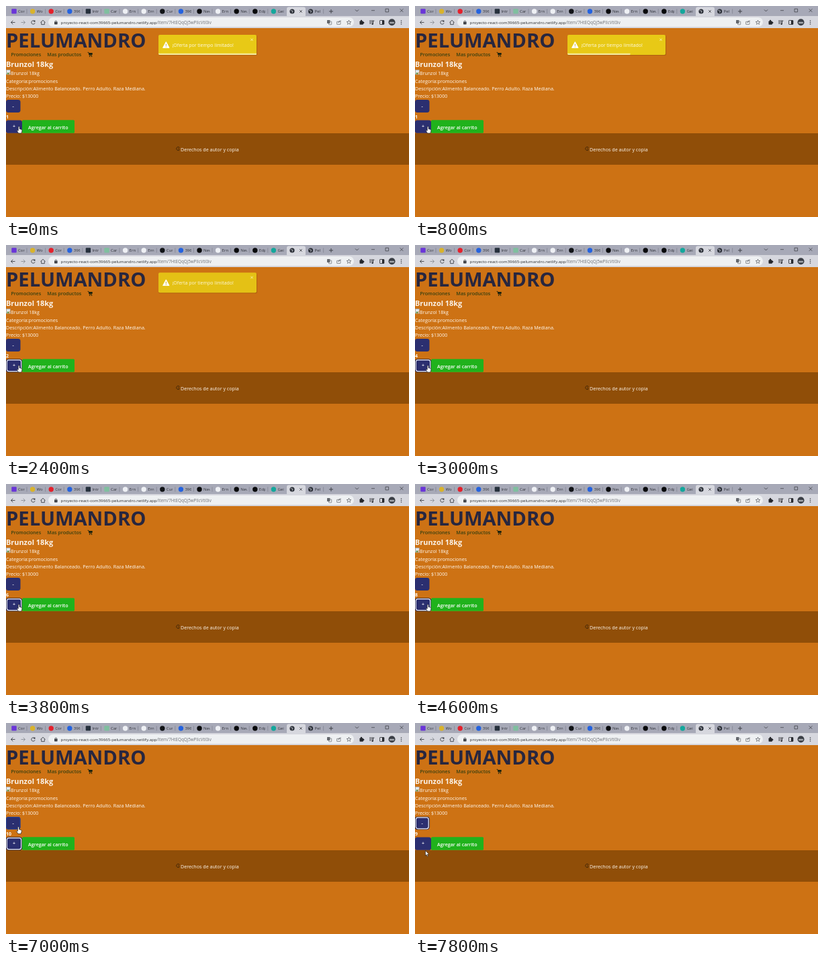
Animation of 600x315 px, one loop 8000 ms. Source, as an HTML page with a canvas:

```html
<!DOCTYPE html>
<html lang="es">
<head>
<meta charset="utf-8">
<title>Tienda</title>
<style>
  html, body { margin: 0; width: 100%; height: 100%; overflow: hidden; background: #cd7214; }
  canvas { display: block; width: 600px; height: 315px; }
</style>
</head>
<body>
<canvas id="stage"></canvas>
<script>
const W = 600, H = 315, LOOP = 8000, STEP = 200, TOP = 33;
const canvas = document.getElementById('stage');
const dpr = window.devicePixelRatio || 1;
canvas.width = W * dpr;
canvas.height = H * dpr;
const c = canvas.getContext('2d');
const FAMILY = '"Open Sans", "Noto Sans", sans-serif';
const DARK = '#35373d', ICON = '#3f4248', BAR = '#d6d7de';

function box(x, y, w, h, fill, r = 0) {
  c.fillStyle = fill;
  c.beginPath();
  c.roundRect(x, y, w, h, r);
  c.fill();
}
function frame(x, y, w, h, color, lw = 0.8, r = 0) {
  c.strokeStyle = color;
  c.lineWidth = lw;
  c.beginPath();
  c.roundRect(x, y, w, h, r);
  c.stroke();
}
function text(s, x, y, size, color, weight = 400, align = 'left') {
  c.font = `${weight} ${size}px ${FAMILY}`;
  c.fillStyle = color;
  c.textAlign = align;
  c.fillText(s, x, y);
  return c.measureText(s).width;
}
function line(color, lw, ...p) {
  c.strokeStyle = color;
  c.lineWidth = lw;
  c.beginPath();
  for (let i = 0; i < p.length; i += 2) c.lineTo(p[i], p[i + 1]);
  c.stroke();
}
function dot(x, y, r, fill) {
  c.fillStyle = fill;
  c.beginPath();
  c.arc(x, y, r, 0, 7);
  c.fill();
}
function ring(x, y, r, color, lw = 0.8, a = 0, b = Math.PI * 2) {
  c.strokeStyle = color;
  c.lineWidth = lw;
  c.beginPath();
  c.arc(x, y, r, a, b);
  c.stroke();
}
function cross(x, y, r, color, lw) {
  line(color, lw, x - r, y - r, x + r, y + r);
  line(color, lw, x + r, y - r, x - r, y + r);
}

const tabs = [
  ['#6a35d8', 'Cor', 1], ['#d9b32c', 'Wo'], ['#e5202b', 'Cor'], ['#2463e0', '396'],
  ['#26303c', 'Intr', 1], ['#7fbf9f', 'Car', 1], ['#eef0f4', 'Ern'], ['#eef0f4', 'Ern'],
  ['#111317', 'Cur'], ['#2463e0', '396'], ['#08090b', 'Nev'], ['#eef0f4', 'Ern'],
  ['#08090b', 'Nev'], ['#08090b', 'Edp'], ['#14a79c', 'Gei'], ['globe', ''], ['globe', 'Pel']
];

function drawTabs() {
  box(0, 0, W, 15, '#a7a9b7');
  const pitch = 27.6;
  tabs.forEach(([color, name, square], i) => {
    const x = 12 + i * pitch;
    if (i === 15) box(x - 8, 1.5, 28, 15, BAR, 3);
    if (color === 'globe') {
      dot(x, 8, 3.6, '#2c3038');
      line('#d5d7de', 0.8, x - 2.3, 6.5, x + 1, 7.5, x, 10.2);
    } else if (square) box(x - 3.7, 4.2, 7.4, 7.4, color, 1);
    else dot(x, 8, 3.7, color);
    c.save();
    c.beginPath();
    c.rect(x + 6, 2, 9.5, 12);
    c.clip();
    text(name, x + 6, 10.2, 6, '#30323a');
    c.restore();
    if (i < 14 || i === 16) line('#777a88', 0.6, x + 19, 4.5, x + 19, 11.5);
  });
  cross(439, 8, 1.8, DARK, 0.8);
  line(DARK, 0.9, 481, 8, 487, 8);
  line(DARK, 0.9, 484, 5, 484, 11);
  line(DARK, 0.8, 520, 5.5, 522.5, 8, 525, 5.5);
  line(DARK, 0.7, 544, 6.7, 549, 6.7);
  frame(565, 4.3, 4.6, 4.6, DARK, 0.7);
  cross(589, 6.7, 2.4, DARK, 0.7);
}

function drawToolbar() {
  box(0, 15, W, TOP - 15, BAR);
  line(ICON, 0.9, 13.5, 24.5, 7.5, 24.5);
  line(ICON, 0.9, 10.3, 21.7, 7.5, 24.5, 10.3, 27.3);
  line('#8d9098', 0.9, 22.5, 24.5, 28.5, 24.5);
  line('#8d9098', 0.9, 25.7, 21.7, 28.5, 24.5, 25.7, 27.3);
  ring(40.5, 24.5, 2.7, ICON, 0.9, 0.3, 5.6);
  box(41.3, 21.5, 2.2, 2.2, ICON);
  line(ICON, 0.9, 51.5, 24.5, 55, 21.3, 58.5, 24.5);
  line(ICON, 0.9, 52.7, 24, 52.7, 27.6, 57.3, 27.6, 57.3, 24);

  box(63, 17, 455, 14, '#eef0f2', 7);
  box(72, 23.6, 4.6, 3.8, ICON, 0.6);
  ring(74.3, 23.5, 1.5, ICON, 0.7, Math.PI, 0);
  const w = text('proyecto-react-com39665-pelumandro.netlify.app', 81.6, 26.7, 6.18, '#2b2d31');
  text('/item/7HtEQqQj5wPIIcVtI0iv', 81.6 + w, 26.7, 6.25, '#6f7278');

  box(478, 21, 4.4, 5, '#64676d', 0.6);
  frame(480.5, 23, 4.2, 4.8, '#64676d', 0.7, 0.5);
  frame(492.6, 23.3, 5.4, 4.2, '#64676d', 0.7, 0.5);
  line('#64676d', 0.8, 494.7, 25.5, 496, 22.6, 499, 22.2);
  c.strokeStyle = '#55585e';
  c.lineWidth = 0.7;
  c.beginPath();
  for (let i = 0; i < 10; i++) {
    const r = i % 2 ? 1.5 : 3.5, a = i * Math.PI / 5 - Math.PI / 2;
    c.lineTo(510.5 + r * Math.cos(a), 24.6 + r * Math.sin(a));
  }
  c.closePath();
  c.stroke();

  box(526.5, 22.5, 5.4, 5.2, '#24262b', 0.7);
  dot(529, 22, 1.2, '#24262b');
  dot(532.2, 25, 1.2, '#24262b');
  for (let i = 0; i < 3; i++) line('#24262b', 0.8, 541, 22 + i * 2, i === 2 ? 544 : 547, 22 + i * 2);
  line('#24262b', 0.8, 548.5, 22.2, 546.5, 22.2, 546.5, 26.5);
  dot(545.7, 26.7, 1.2, '#24262b');
  frame(556.5, 21.5, 6.4, 6, '#24262b', 0.8, 0.6);
  box(560, 21.5, 2.9, 6, '#24262b');
  dot(574.5, 24.3, 5, '#3a3e45');
  box(571, 23.8, 7, 2.4, '#a4a8ae', 1);
  for (let i = -1; i < 2; i++) dot(588.5, 24.5 + i * 2.5, 0.8, ICON);
}

function drawPage() {
  box(0, TOP, W, H - TOP, '#cd7214');
  text('PELUMANDRO', 0, 62, 29.2, '#27263f', 700);
  text('Promociones', 7.5, 75.3, 7.1, '#363f10', 600);
  text('Mas productos', 61.3, 75.3, 7.15, '#363f10', 600);
  line('#16200e', 0.9, 121.6, 69.3, 123, 69.3, 124.3, 73.7, 128, 73.7);
  box(123.5, 70, 5.2, 2.8, '#16200e', 0.4);
  dot(124.6, 75.2, 0.8, '#16200e');
  dot(127.5, 75.2, 0.8, '#16200e');

  text('Brunzol 18kg', 0, 91, 10.9, '#fbf3e9', 700);
  box(0.4, 95.3, 6, 7, '#e4e9ef');
  frame(0.6, 95.5, 5.7, 6.6, '#8b9097', 0.5);
  c.fillStyle = '#4d9448';
  c.beginPath();
  c.moveTo(1, 101.7);
  c.lineTo(3, 98.8);
  c.lineTo(5, 101.7);
  c.fill();
  line('#cd7214', 0.9, 3, 102.4, 6.6, 98.6);
  const body = '#fffaf3';
  text('Brunzol 18kg', 7, 103.4, 7.05, body);
  text('Categoría:promociones', 0, 114.5, 7.1, body);
  text('Descripción:Alimento Balanceado. Perro Adulto. Raza Mediana.', 0, 125.5, 7.08, body);
  text('Precio: $13000', 0, 136.7, 7.05, body);

  box(0, 190, W, 47, '#904e08');
  ring(256.3, 213, 2.6, '#352008', 0.8, 0.5, 5.8);
  line('#352008', 0.7, 256.2, 212, 257.6, 213.2, 256.2, 214.3);
  text('Derechos de autor y copia', 260, 216.5, 7.14, body);
}

function button(x, y, w, h, label, focused, hovered) {
  box(x, y, w, h, '#2b2f70', 3.4);
  if (hovered) frame(x + 0.5, y + 0.5, w - 1, h - 1, '#2c4c9c', 0.8, 3);
  if (focused) {
    frame(x + 0.3, y + 0.3, w - 0.6, h - 0.6, '#15152c', 0.8, 3.6);
    frame(x + 1.3, y + 1.2, w - 2.6, h - 2.4, '#f4f4fa', 1.2, 3);
  }
  text(label, x + w / 2, y + h / 2 + 2.3, 7.05, '#fff', 600, 'center');
}

// Toast leaves with a small dip, then flies up while fading.
function drawToast(t) {
  const END = 2225, OUT = 360;
  const p = Math.max(0, (t - END) / OUT);
  if (p >= 1) return;
  const dy = p < 0.45 ? 9 * Math.sin(p / 0.45 * Math.PI / 2) : 9 - 300 * (p - 0.45);
  c.save();
  c.beginPath();
  c.rect(0, TOP, W, H);
  c.clip();
  c.globalAlpha = p < 0.45 ? 1 : (1 - p) / 0.55;
  c.translate(0, dy);
  box(227, 43.8, 147, 30.2, 'rgba(80,40,0,.25)', 2);
  box(227, 43, 146, 30, '#e8c916', 2);
  const w = 146 * Math.max(0, 1 - t / END);
  box(227, 70.7, w, 2.3, '#f5e99c', [0, 0, 1, 2]);
  c.fillStyle = '#fff';
  c.beginPath();
  c.moveTo(238.3, 53.6);
  c.lineTo(243, 62.3);
  c.lineTo(233.6, 62.3);
  c.closePath();
  c.fill();
  line('#fff', 1, 238.3, 53.6, 243, 62.3, 233.6, 62.3, 238.3, 53.6);
  line('#c9a80f', 1, 238.3, 56.6, 238.3, 59.5);
  dot(238.3, 61, 0.6, '#c9a80f');
  text('¡Oferta por tiempo limitado!', 247.5, 60.6, 7, '#fffbe6');
  cross(366, 50.3, 1.7, '#f8f0b4', 0.9);
  c.restore();
}

const ease = k => k * k * (3 - 2 * k);
const part = (t, a, b) => ease(Math.min(1, Math.max(0, (t - a) / (b - a))));

function pointer(t) {
  const up = part(t, 5900, 7000), down = part(t, 7300, 7800);
  return [19.2 - 0.7 * up - 3 * down, 179.8 - 24.6 * up + 35.3 * down];
}

function drawPointer(x, y, hand) {
  c.save();
  c.translate(x, y);
  c.lineJoin = 'round';
  c.beginPath();
  if (hand) {
    c.scale(1.08, 1.08);
    c.moveTo(-0.9, 0.6);
    c.quadraticCurveTo(0, -0.8, 0.9, 0.6);
    c.lineTo(0.9, 3.4);
    c.lineTo(3.5, 4.1);
    c.quadraticCurveTo(4.6, 4.5, 4.4, 6);
    c.lineTo(3.5, 9.4);
    c.lineTo(-0.6, 9.4);
    c.lineTo(-2.7, 5.9);
    c.quadraticCurveTo(-2.4, 4.8, -0.9, 5.9);
  } else {
    const p = [0, 0, 0, 7.5, 1.7, 6, 2.9, 8.7, 4, 8.2, 2.9, 5.6, 5.2, 5.4];
    for (let i = 0; i < p.length; i += 2) c.lineTo(p[i], p[i + 1]);
  }
  c.closePath();
  c.fillStyle = '#fff';
  c.fill();
  c.strokeStyle = '#15151c';
  c.lineWidth = 0.6;
  c.stroke();
  c.restore();
}

function count(t) {
  if (t >= 7400) return 9;
  return Math.min(10, 1 + Math.max(0, Math.floor((t - 1800) / 400)));
}

function draw(t) {
  c.setTransform(dpr, 0, 0, dpr, 0, 0);
  drawPage();
  const [x, y] = pointer(t);
  const onMinus = y > 140 && y < 159, onPlus = y > 170 && y < 190;
  button(0, 140, 21.5, 19, '-', t >= 7400, onMinus);
  text(count(t), 0, 167.8, 7.05, '#fffaf3', 700);
  button(0, 170.4, 24, 19.4, '+', t >= 2200 && t < 7400, false);
  box(24, 170.2, 78, 19.6, '#20b21c', 1.5);
  text('Agregar al carrito', 62.8, 183.5, 7.1, '#fff', 600, 'center');
  drawToast(t);
  drawTabs();
  drawToolbar();
  drawPointer(x, y, onMinus || onPlus);
}

// The picture advances in fixed steps.
const start = performance.now();
function tick() {
  const t = (performance.now() - start) % LOOP;
  draw(Math.floor(t / STEP) * STEP);
  requestAnimationFrame(tick);
}
tick();
</script>
</body>
</html>
```
